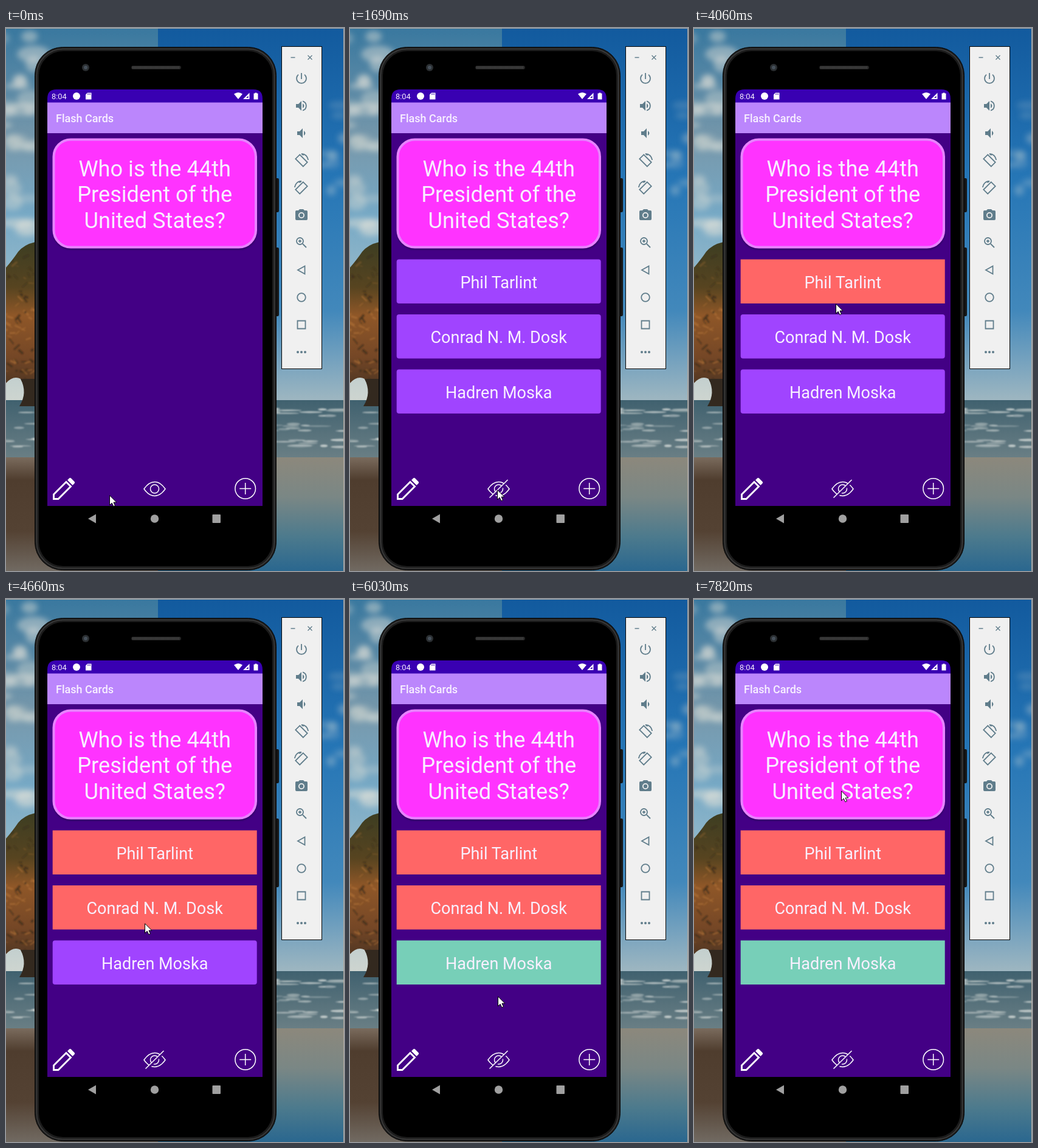
An HTML page that plays this animation: 556 px wide and 893 px high, repeating every 8 s.

```html
<!DOCTYPE html>
<html lang="en">
<head>
<meta charset="utf-8">
<title>Flash Cards</title>
<style>
  html, body { margin: 0; width: 100%; height: 100%; overflow: hidden; background: #5d99c5; }
  svg { display: block; width: 100%; height: 100%; }
  text { font-family: Roboto, "Open Sans", sans-serif; fill: #f8f0ff; }
  .mid { text-anchor: middle; }
  .big { font-size: 36.2px; }
  .answer { font-size: 27px; }
  .line { fill: none; stroke: #607d8b; stroke-width: 1.8; }
</style>
</head>
<body>
<svg viewBox="0 0 556 893" preserveAspectRatio="none">
  <defs>
    <linearGradient id="skyL" x2="0" y2="1">
      <stop offset="0" stop-color="#39789f"/><stop offset=".3" stop-color="#7798ab"/>
      <stop offset=".5" stop-color="#76a9c6"/><stop offset="1" stop-color="#d0d6d0"/>
    </linearGradient>
    <linearGradient id="skyR" x2="0" y2="1">
      <stop offset="0" stop-color="#125a9e"/><stop offset=".4" stop-color="#2676b6"/>
      <stop offset=".75" stop-color="#4288bb"/><stop offset="1" stop-color="#a3b9c1"/>
    </linearGradient>
    <linearGradient id="rock" x2="0" y2="1">
      <stop offset="0" stop-color="#3c3d22"/><stop offset=".28" stop-color="#574420"/>
      <stop offset=".45" stop-color="#8f5728"/><stop offset=".7" stop-color="#754726"/>
      <stop offset="1" stop-color="#33291f"/>
    </linearGradient>
    <linearGradient id="sea" x2="0" y2="1">
      <stop offset="0" stop-color="#40616f"/><stop offset="1" stop-color="#6a7f85"/>
    </linearGradient>
    <linearGradient id="sandL" x2="0" y2="1">
      <stop offset="0" stop-color="#7a6b5d"/><stop offset=".2" stop-color="#4f3d2e"/>
      <stop offset=".65" stop-color="#544233"/><stop offset="1" stop-color="#716a62"/>
    </linearGradient>
    <linearGradient id="sandR" x2="0" y2="1">
      <stop offset="0" stop-color="#8c887c"/><stop offset=".35" stop-color="#7a8785"/>
      <stop offset=".7" stop-color="#4c7a8d"/><stop offset="1" stop-color="#2a678f"/>
    </linearGradient>
    <filter id="soft" x="-50%" y="-50%" width="200%" height="200%"><feGaussianBlur stdDeviation="5"/></filter>
    <filter id="haze" x="-50%" y="-50%" width="200%" height="200%"><feGaussianBlur stdDeviation="1"/></filter>
    <clipPath id="cliff"><path d="M0 394Q12 380 20 368Q30 356 48 352V622H25Q37 600 24 577Q12 571 0 584Z"/></clipPath>
  </defs>

  <!-- Beach -->
  <rect width="250" height="620" fill="url(#skyL)"/>
  <rect x="250" width="306" height="620" fill="url(#skyR)"/>
  <g id="clouds" fill="#dfe0d8" filter="url(#soft)"/>
  <g clip-path="url(#cliff)">
    <rect y="350" width="50" height="272" fill="url(#rock)"/>
    <g id="cracks" filter="url(#haze)"/>
  </g>
  <rect y="612" width="556" height="96" fill="url(#sea)"/>
  <path d="M22 622Q36 600 24 577H48V622Z" fill="#33291f"/>
  <g id="foam" fill="#dde1de" filter="url(#haze)"/>
  <rect y="706" width="250" height="187" fill="url(#sandL)"/>
  <rect x="250" y="706" width="306" height="187" fill="url(#sandR)"/>
  <path d="M0 .5H555.5V893" fill="none" stroke="#b3aaa0"/>

  <!-- Phone -->
  <path d="M443 247h4q2 0 2 3v50q0 3-2 3h-4zM443 361h4q2 0 2 3v107q0 3-2 3h-4z" fill="#161616"/>
  <rect x="47.5" y="31.5" width="397" height="860" rx="46" fill="#1c1c1c" stroke="#060606"/>
  <rect x="50.5" y="34.5" width="391" height="854" rx="43" fill="none" stroke="#3d3d3d" stroke-width="1.5"/>
  <rect x="54" y="38" width="384" height="847" rx="40"/>
  <circle cx="131" cy="65" r="6" fill="#2b2f32"/><circle cx="131" cy="65" r="3" fill="#46505a"/>
  <rect x="206" y="62" width="82" height="6" rx="3" fill="#252525"/>
  <path d="M208 65H286" stroke="#4a4a4a" stroke-width="4" stroke-dasharray="1 1"/>

  <!-- App -->
  <rect x="68" y="122" width="354" height="664" fill="#430085"/>
  <path d="M68 123V116q0-15 15-15H407q15 0 15 15V123Z" fill="#3900b2"/>
  <rect x="68" y="122.500" width="354" height="50.500" fill="#bb86fc"/>
  <text x="75" y="116.500" font-size="12.800">8:04</text>
  <g fill="#fff">
    <circle cx="116" cy="112" r="6"/>
    <path d="M134 106.500h6.500v11h-9.500v-8zM375 108.500q7-5 14 0l-7 8.500zM407.500 107.500h2v-1h3v1h2v10h-7z"/>
    <path d="M400.500 106.500V117H390ZM398.500 111.500V115H395Z" fill-rule="evenodd"/>
  </g>
  <path d="M134.500 107.500v2.500m2-2.500v2.500m2-2.500v2.500" stroke="#3900b2" stroke-width=".8"/>
  <text x="82" y="155" font-size="18" font-weight="500">Flash Cards</text>

  <rect x="77" y="185" width="336" height="180" rx="29" fill="#18003c" opacity=".38" filter="url(#haze)"/>
  <rect id="card" x="78.500" y="183.500" width="332.500" height="177" rx="28" stroke-width="4"/>
  <g id="question" class="mid big"></g>
  <text id="reply" class="mid big" x="244.700" y="286.500" style="fill:#f6dccb">Hadren Moska</text>
  <g id="answers"></g>

  <path d="M78.500 774.500V767L99 746.500L106.500 754L86 774.500Z" fill="none" stroke="#fff" stroke-width="2.900"/>
  <path d="M101 743.500L104 740.500Q105.500 739 107 740.500L112.500 746Q114 747.500 112.500 749L109.500 752Z" fill="#fff"/>
  <g fill="none" stroke="#fff" stroke-width="1.500">
    <path d="M227 758Q235 746.500 244.500 746.500T262 758Q254 769.500 244.500 769.500T227 758Z"/>
    <circle cx="244.500" cy="758" r="7"/>
    <g id="slash"><path d="M231.500 773.500L260.500 744.500" stroke="#430085" stroke-width="4"/><path d="M229.500 772.500L259.500 743"/></g>
    <circle cx="393.700" cy="757.500" r="16.800"/>
    <path d="M393.700 748v19m-9.500-9.500h19"/>
  </g>
  <g fill="#a0a0a0">
    <path d="M135 807L148 799.500V814.500Z"/><circle cx="244.500" cy="807" r="6.700"/>
    <rect x="339.500" y="800" width="13.500" height="14" rx="1"/>
  </g>

  <!-- Emulator controls -->
  <rect x="453.500" y="30.500" width="66" height="530" fill="#f0f0f0" stroke="#050505"/>
  <path class="line" d="M468.500 48.500h7M496.500 45l7 7m0-7l-7 7" style="stroke-width:1.300"/>
  <g id="tools" fill="#607d8b"></g>

  <path id="cursor" d="M.5.8V16.600L4.200 13.200L6.800 18.700L9.500 17.500L7 12.100H11.800Z" fill="#fff" stroke="#000"/>
</svg>
<script>
const $ = id => document.getElementById(id);
const LOOP = 8000;
const repeat = (n, make) => Array.from({ length: n }, (_, i) => make(i)).join("");

// Scenery from a seeded generator
let seed = 11;
const random = (min, max) => {
  seed = seed * 16807 % 2147483647;
  return min + (max - min) * seed / 2147483647;
};
const blob = (x, y, rx, ry, opacity) =>
  `<ellipse cx="${x}" cy="${y}" rx="${rx}" ry="${ry}" opacity="${opacity}"/>`;

$("clouds").innerHTML =
  repeat(26, () => blob(random(-5, 50), random(10, 345), random(10, 28), random(4, 14), random(.2, .55))) +
  repeat(9, () => blob(random(515, 560), random(85, 330), random(8, 24), random(4, 10), random(.1, .35)));

$("cracks").innerHTML = repeat(70, i => {
  const x = random(-4, 46), y = random(375, 615);
  return `<path d="M${x} ${y}l${random(3, 10)} ${random(-9, 9)}" stroke="${i % 2 ? "#33271a" : "#b07236"}"
    stroke-width="${random(1, 4)}" opacity="${y < 430 ? .3 : .6}"/>`;
});

// Breakers roll in along three bands
$("foam").innerHTML = repeat(150, i => {
  const y = [631, 657, 682][i % 3] + random(-7, 7);
  return blob(random(0, 556), y, random(6, 24), random(.7, 2.4), random(.3, .8));
});

$("question").innerHTML = ["Who is the 44th", "President of the", "United States?"]
  .map((s, i) => `<text x="244.700" y="${244 + 42.3 * i}">${s}</text>`).join("");

// Toolbar icons on a 24-unit grid
const line = d => `<path class="line" d="${d}"/>`;
const ring = (r, x = 12, y = 12) => `<circle class="line" cx="${x}" cy="${y}" r="${r}"/>`;
const speaker = x => `<path d="M${x} 9v6h4l5 5V4l-5 5z"/><path d="M${x + 11} 8v8q5-4 0-8"/>`;
const rotate = line("M9.200 2.300L2.300 9.200L14.800 21.700L21.700 14.800ZM12 .8Q21 1 23.200 11M12 .8l3.500 2.500");
const tools = [
  line("M12 3v10M7 5.600a8 8 0 1 0 10 0"),
  speaker(3) + line("M14 4.300a8 8 0 0 1 0 15.400"),
  speaker(5),
  rotate,
  `<g transform="matrix(-1 0 0 1 24 0)">${rotate}</g>`,
  `<path d="M9 2L7 4H4q-2 0-2 2v12q0 2 2 2h16q2 0 2-2V6q0-2-2-2h-3L15 2z"/>
    <circle cx="12" cy="12" r="4.100" fill="none" stroke="#f0f0f0" stroke-width="1.800"/>`,
  ring(5.500, 9.500, 9.500) + line("M14 14l6 6M7 9.500h5M9.500 7v5"),
  line("M6 12L17.500 5.500V18.500Z"),
  ring(6.800),
  line("M5.500 5.500h13v13h-13z"),
  repeat(3, i => `<circle cx="${6 + 6 * i}" cy="12" r="2"/>`)
];
$("tools").innerHTML = tools.map((icon, i) =>
  `<g transform="translate(474 ${71 + 45 * i})">${icon}</g>`).join("");

// Each answer changes colour when it is tapped
const answers = [
  { name: "Phil Tarlint", tap: 4060, color: "#ff6666" },
  { name: "Conrad N. M. Dosk", tap: 4660, color: "#ff6666" },
  { name: "Hadren Moska", tap: 5090, color: "#77cfb8" }
];
$("answers").innerHTML = answers.map((a, i) => {
  const y = 380.5 + 90.5 * i;
  return `<rect x="76.700" y="${y}" width="336" height="72.500"/>
    <text class="mid answer" x="244.700" y="${y + 47}">${a.name}</text>`;
}).join("");
const plates = [...$("answers").querySelectorAll("rect")];

const PACE = 135;
const strokes = [
  { at: 960, steps: 4, x: 242, y: 759 },
  { at: 3300, steps: 3, x: 233, y: 433 },
  { at: 4060, steps: 3, x: 233, y: 510 },
  { at: 4660, steps: 3, x: 214, y: 597 },
  { at: 5340, steps: 2, x: 232, y: 390 },
  { at: 5610, steps: 1, x: 240, y: 577 },
  { at: 5760, steps: 3, x: 243, y: 653 },
  { at: 6300, steps: 4, x: 242, y: 315 }
];
const smooth = p => p * p * (3 - 2 * p);

function pointer(t) {
  let x = 170, y = 768;
  for (const s of strokes) {
    if (t < s.at) break;
    const step = Math.min(s.steps, Math.floor((t - s.at) / PACE) + 1);
    const p = smooth(step / s.steps);
    x += (s.x - x) * p;
    y += (s.y - y) * p;
  }
  return [Math.round(x), Math.round(y)];
}

const show = (id, on) => $(id).setAttribute("visibility", on ? "visible" : "hidden");

function draw(t) {
  const open = t >= 1690;
  const flipped = t >= 6840 && t < 7690;
  show("answers", open);
  show("slash", open);
  show("question", !flipped);
  show("reply", flipped);
  $("card").setAttribute("fill", flipped ? "#ff7f45" : "#ff33ff");
  $("card").setAttribute("stroke", flipped ? "#ffbd5c" : "#e783ff");
  plates.forEach((plate, i) => {
    const tapped = t >= answers[i].tap;
    plate.setAttribute("fill", tapped ? answers[i].color : "#a044ff");
    plate.setAttribute("rx", tapped ? 0 : 4);
  });
  $("cursor").setAttribute("transform", `translate(${pointer(t)})`);
}

const start = performance.now();
function tick(now) {
  draw(Math.max(0, now - start) % LOOP);
  requestAnimationFrame(tick);
}
draw(0);
requestAnimationFrame(tick);
</script>
</body>
</html>
```
